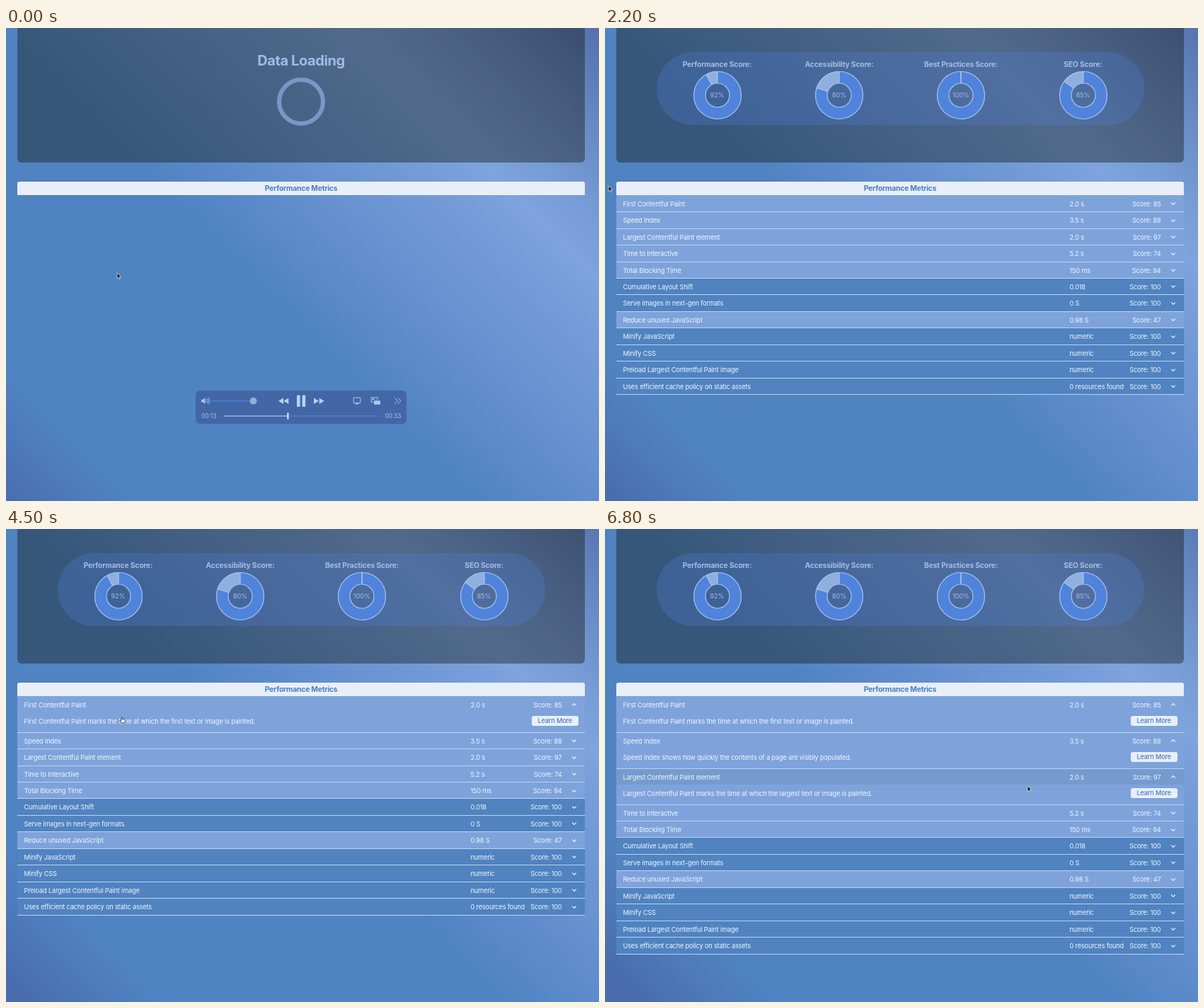
Animation of 838 by 668 pixels, one loop 6900 ms. Source, as an HTML page:

```html
<!DOCTYPE html>
<html lang="en">
<head>
<meta charset="utf-8">
<title>Performance report</title>
<style>
  html, body { margin: 0; width: 100%; height: 100%; overflow: hidden; }
  body { position: relative; background: #5083c1; color: #f1f6fd;
    font: 400 9.2px/23.5px Inter, Roboto, sans-serif; letter-spacing: -.16px; white-space: nowrap; }
  body *, svg { position: absolute; box-sizing: border-box; }
  svg * { position: static; }
  svg { overflow: visible; }
  #stage { left: 0; top: 0; width: 838px; height: 668px; overflow: hidden; }
  #sky { left: -100px; top: 0; width: 1000px; height: 668px; }
  #panel { left: 16px; top: -10px; width: 802px; height: 200px; border-radius: 6px; background: rgba(20,27,24,.42); }
  #loading b { left: 0; width: 834px; top: 32px; text-align: center; font-size: 20px; line-height: 28px;
    letter-spacing: -.4px; color: #9fbbe8; }
  .ring { left: 383px; top: 69.5px; width: 68px; height: 68px; border: 6px solid rgba(150,185,240,.38); }
  #pill { left: 73px; top: 34px; width: 689px; height: 103px; border-radius: 52px; background: rgba(80,125,218,.28); }
  .pie { top: 0; width: 160px; text-align: center; }
  .pie b { left: 0; width: 160px; top: 43px; line-height: 16px; font-size: 10.3px; color: #a5bde3; }
  .pie span { left: 0; width: 160px; top: 86.5px; line-height: 16px; font-size: 9px; color: #a5bde3; letter-spacing: 0; }
  .pie svg { left: 80px; top: 94.5px; width: 1px; height: 1px; fill: none; }
  #title { left: 16px; top: 217px; width: 802px; height: 19px; border-radius: 3px 3px 0 0; background: #e9eff8;
    color: #497cc3; font-size: 10.3px; font-weight: 700; line-height: 19px; letter-spacing: -.2px; text-align: center; }
  #table { left: 16px; top: 236px; width: 802px; padding-top: .7px; background: #7ea3db; }
  #table .item { position: relative; border-bottom: 1px solid #bcd1f0; background: #5083c0; }
  #table .item.low { background: #7ea3db; }
  .head { position: relative !important; height: 22.46px; }
  .head.hot { background: #759bce; }
  .head span { top: 0; }
  .name, .body p { left: 9.5px; }
  .value { left: 640.5px; }
  .score { right: 32.5px; }
  .head svg { left: 787px; top: 11.5px; width: 1px; height: 1px; }
  .body { position: relative !important; overflow: hidden; height: 0; }
  .body p { margin: 0; top: .5px; }
  .body i { left: 726.5px; top: 5px; width: 66.5px; height: 14px; border-radius: 3px; background: #e9eff8;
    color: #497cc3; font-style: normal; font-weight: 500; line-height: 14px; text-align: center; }
  #player { left: 268px; top: 512px; width: 298px; height: 47px; border-radius: 6px; background: rgba(57,84,148,.6); }
  #player svg { left: 0; top: 0; width: 298px; height: 47px; }
  #player span { top: 28px; line-height: 16px; font-size: 8.3px; letter-spacing: 0; color: #a9c4ec; }
  #cursor { left: 0; top: 0; width: 1px; height: 1px; }
</style>
</head>
<body>
<div id="stage">
  <div id="sky"></div>
  <div id="panel"></div>
  <div id="loading"><b>Data Loading</b><div class="ring"></div><div class="ring"></div></div>
  <div id="scores"><div id="pill"></div></div>
  <div id="title">Performance Metrics</div>
  <div id="table"></div>
  <div id="player">
    <svg fill="#a9c6ee" stroke="none">
      <path d="M8 12.7h2.3l3-2.6v9l-3-2.6H8z"/>
      <g fill="none" stroke="#a9c6ee" stroke-width=".9" stroke-linecap="round">
        <path d="M15 12.7q1.3 1.9 0 3.8M16.7 11.3q2.4 3.3 0 6.6M18.4 10.2q3 4.4 0 8.8"/>
        <path d="M225.5 17.5h-2.3v-7.4h9.6v7.4h-2.3" stroke-width="1"/>
        <path d="M251 16.2h-3V9.8h9v3.4" stroke-width="1"/>
        <path d="M281.5 10.5l4 4-4 4M286 10.5l4 4-4 4" stroke-width="1"/>
      </g>
      <path d="M225 19.4l3-3.4 3 3.4zM252 14.2h9v5.6h-9zM249.6 11.2h3v2h-3z"/>
      <path d="M22 14h60v1.6H22z" fill="#4583da"/>
      <circle cx="81.5" cy="14.8" r="5" fill="#8eaedc"/>
      <g fill="#b9d0f1">
        <path d="M124 10.5v8.4l-7-4.2zM131.3 10.5v8.4l-7-4.2z"/>
        <path d="M167 10.5v8.4l7-4.2zM174.7 10.5v8.4l7-4.2z"/>
        <rect x="143" y="6.5" width="4.6" height="16.5" rx="1"/>
        <rect x="150.6" y="6.5" width="4.6" height="16.5" rx="1"/>
      </g>
      <path d="M40 35.2h218v1.6H40z" fill="#587db9"/>
      <path d="M40 35.2h90v1.6H40z" fill="#8fb1e3"/>
      <rect x="129.3" y="31.3" width="2.2" height="9.4" rx="1" fill="#d3e2f7"/>
    </svg>
    <span style="left:8px">00:13</span><span style="right:7.5px">00:33</span>
  </div>
  <svg id="cursor" stroke-linejoin="round">
    <path id="arrow" d="M0 0V7.6L1.8 6.1 3 8.8 4.3 8.2 3.1 5.6 5.6 5.4Z" fill="#111" stroke="#e8eef8" stroke-width=".7"/>
    <path id="hand" d="M-.8.7Q0-.3.7.7V3L3.5 3.6Q4.5 4 4.3 5L3.6 8.4H-.6L-3 5.2Q-2.8 4-1.6 4.7L-.8 5.4Z"
      fill="#f4f6fa" stroke="#222c40" stroke-width=".8"/>
  </svg>
</div>
<script>
const LOOP = 6900, STEP = 100, REPORT_AT = 2100;
const $ = id => document.getElementById(id);

// Diagonal backdrop: [x - y, colour]
const SKY = [[-668, '#496dae'], [-570, '#4d7aba'], [-480, '#5083c1'], [0, '#5083c1'], [110, '#5b8aca'],
  [250, '#6a93d2'], [350, '#7199d6'], [480, '#7ea3dd'], [560, '#789cd6'], [680, '#688bc6'], [838, '#5470aa']];
$('sky').style.background = 'linear-gradient(45deg,' +
  SKY.map(([u, c]) => `${c} ${(u + 768) / 16.68}%`).join() + ')';

const PIES = [['Performance', 92, 158.5], ['Accessibility', 80, 331], ['Best Practices', 100, 503], ['SEO', 85, 675.5]];
const spoke = pct => `<path d="M0-17V-34" transform="rotate(${pct * 3.6})"/>`;
$('scores').innerHTML += PIES.map(([name, pct, x]) => `
  <div class="pie" style="left:${x - 80}px"><b>${name} Score:</b>
    <svg><g stroke-width="17" transform="rotate(-90)">
      <circle r="25.5" stroke="#4f83dc" pathLength="100" stroke-dasharray="${pct} 100"/>
      <circle r="25.5" stroke="#8fafdf" pathLength="100" stroke-dasharray="0 ${pct} ${100 - pct} 0"/></g>
      <g stroke="#a8c2eb" stroke-width="1.2"><circle r="33.5"/><circle r="17"/>${spoke(0)}${spoke(pct)}</g></svg>
    <span>${pct}%</span></div>`).join('');

const ROWS = [
  ['First Contentful Paint', '2.0 s', 85, 'First Contentful Paint marks the time at which the first text or image is painted.'],
  ['Speed Index', '3.5 s', 88, 'Speed Index shows how quickly the contents of a page are visibly populated.'],
  ['Largest Contentful Paint element', '2.0 s', 97, 'Largest Contentful Paint marks the time at which the largest text or image is painted.'],
  ['Time to Interactive', '5.2 s', 74],
  ['Total Blocking Time', '150 ms', 94],
  ['Cumulative Layout Shift', '0.018', 100],
  ['Serve images in next-gen formats', '0 S', 100],
  ['Reduce unused JavaScript', '0.98 S', 47],
  ['Minify JavaScript', 'numeric', 100],
  ['Minify CSS', 'numeric', 100],
  ['Preload Largest Contentful Paint image', 'numeric', 100],
  ['Uses efficient cache policy on static assets', '0 resources found', 100]];
$('table').innerHTML = ROWS.map(([name, value, score, note]) => `
  <div class="item ${score < 100 ? 'low' : ''}"><div class="head"><span class="name">${name}</span>
    <span class="value">${value}</span><span class="score">Score: ${score}</span>
    <svg><path d="M-2.5-1.2L0 1.3 2.5-1.2" fill="none" stroke="#f1f6fd" stroke-width="1.2" stroke-linecap="round"/></svg></div>
    ${note ? `<div class="body"><p>${note}</p><i>Learn More</i></div>` : ''}</div>`).join('');

const heads = [...document.querySelectorAll('.head')];
const bodies = [...document.querySelectorAll('.body')];
const chevrons = [...document.querySelectorAll('.head path')];
const rings = [...document.querySelectorAll('.ring')];

const OPEN_AT = [3800, 4885, 5900], OPEN_MS = 300, BODY_H = 27.5;
const HOVER = [[3100, 4500, 0], [4800, 5400, 1], [5700, LOOP, 2]];
// Pointer path: [time, x, y]
const PATH = [[0, 157, 346], [100, 157, 346], [600, 5, 223], [2800, 5, 223], [2900, 61, 225], [3300, 158, 250],
  [4300, 158, 250], [4800, 175, 294], [5300, 175, 294], [5700, 180, 346], [6300, 180, 346], [6800, 597, 363]];

const clamp = v => Math.min(1, Math.max(0, v));
const ramp = (t, from, to) => clamp((t - from) / (to - from));
const smooth = p => p * p * (3 - 2 * p);

function pointer(t) {
  let i = 0;
  while (i < PATH.length - 2 && t >= PATH[i + 1][0]) i++;
  const [t0, x0, y0] = PATH[i], [t1, x1, y1] = PATH[i + 1];
  const e = smooth(ramp(t, t0, t1));
  return [x0 + (x1 - x0) * e, y0 + (y1 - y0) * e];
}

function draw(t) {
  const ready = t >= REPORT_AT;
  $('sky').style.transform = `translateX(${60 * t / LOOP}px)`;
  $('loading').hidden = ready;
  $('scores').hidden = $('table').hidden = !ready;
  $('player').style.opacity = 1 - ramp(t, 200, 600);

  // Two soft rings drift apart while loading
  const d = 9 * (t / 2000) ** 2;
  rings.forEach((ring, i) => {
    const a = 50 + d, b = 50 - d;
    ring.style.borderRadius = `${a}% ${b}% ${a}% ${b}% / ${a}% ${a}% ${b}% ${b}%`;
    ring.style.transform = `rotate(${(i ? -1 : 1) * t * .04 + i * 90}deg)`;
  });

  bodies.forEach((body, i) => {
    const p = ramp(t, OPEN_AT[i], OPEN_AT[i] + OPEN_MS), e = 1 - (1 - p) ** 2.1;
    body.style.height = BODY_H * e + 'px';
    for (const part of body.children) part.style.opacity = smooth(p);
    chevrons[i].setAttribute('transform', `rotate(${-180 * e})`);
  });
  heads.forEach((head, i) =>
    head.classList.toggle('hot', HOVER.some(([from, to, row]) => row === i && t >= from && t < to)));

  const [x, y] = pointer(t), hand = t >= 3100 && t < 6400;
  $('cursor').style.transform = `translate(${x}px,${y}px)`;
  $('hand').style.display = hand ? '' : 'none';
  $('arrow').style.display = hand ? 'none' : '';
}

const start = performance.now();
function tick() {
  const t = (performance.now() - start) % LOOP;
  draw(Math.floor(t / STEP) * STEP);
  requestAnimationFrame(tick);
}
tick();
</script>
</body>
</html>
```
